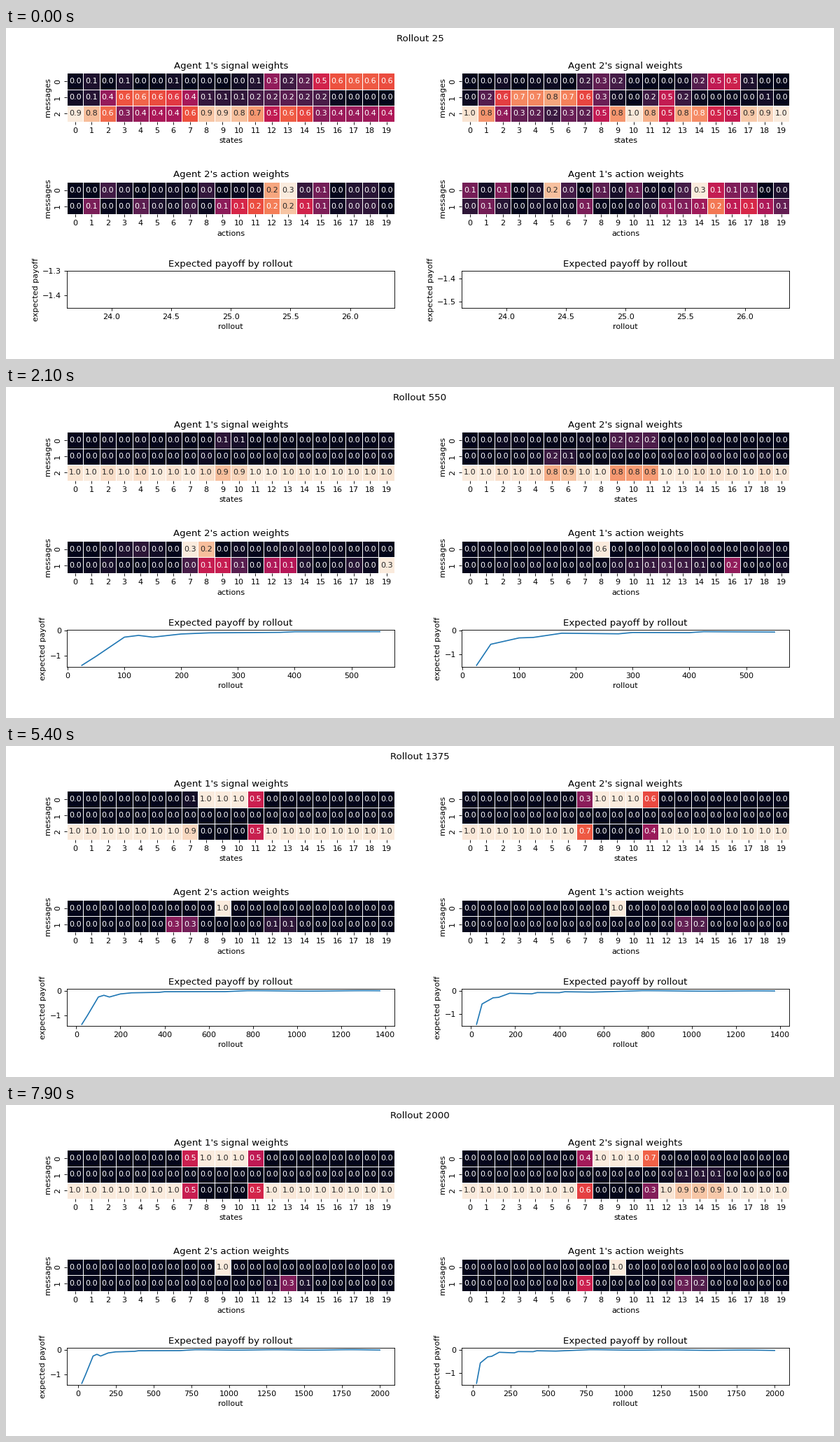
These frames come from a looping animation (1183 by 473 pixels, 8000 ms). A matplotlib script:

```python
import numpy as np
import matplotlib.pyplot as plt
from matplotlib.animation import FuncAnimation
from matplotlib.colors import LinearSegmentedColormap

W, H, DPI = 1183, 473, 80
FRAMES, STEP = 80, 25
LEFT, RIGHT = 87, 651
AX_W, CELL_H = 468.4, 23.2
SIGNAL_Y, ACTION_Y, PAYOFF_Y, PAYOFF_H = 64.4, 220, 347.2, 53

COLS = np.arange(20)
STAGES = [0, 7, 21, 30, 44, 63, 79]       # frames where learning turns
NOISE = [.09, .06, .035, .02, .01, .01, .01]

STOPS = [
    (0, "#03051a"), (1 / 11, "#221331"), (2 / 11, "#451c47"),
    (3 / 11, "#6a1f56"), (4 / 11, "#921c5b"), (5 / 11, "#b91657"),
    (6 / 11, "#d92847"), (7 / 11, "#ed503e"), (8 / 11, "#f47d57"),
    (9 / 11, "#f6a47c"), (10 / 11, "#f7c9aa"), (1, "#faebdd"),
]
ROCKET = LinearSegmentedColormap.from_list("rocket", STOPS)


class Weights:
    """Two rows of weights: flat-topped bumps that come and go, plus noise.

    A bump is (row, column, width, height, first stage, last stage).
    With edges (lo, hi) per stage from 2 on, a plateau grows in row 0
    and a third row takes whatever weight is left.
    """

    def __init__(self, seed, bumps, edges=None):
        self.bumps, self.edges = bumps, edges
        rng = np.random.default_rng(seed)
        shape = (len(STAGES), 2, 20)
        self.noise = rng.random(shape) ** 3 * np.reshape(NOISE, (-1, 1, 1))

    def at(self, frame):
        stage = np.interp(frame, STAGES, range(len(STAGES)))
        i = min(int(stage), len(STAGES) - 2)
        t = stage - i
        rows = (1 - t) * self.noise[i] + t * self.noise[i + 1]
        for row, col, width, height, first, last in self.bumps:
            life = np.clip(1 - max(first - stage, stage - last), 0, 1)
            rows[row] += life * height * np.exp(-((COLS - col) / width) ** 4)
        if self.edges is None:
            return np.clip(rows, 0, 1)
        lo, hi = (np.interp(stage, range(2, 7), e) for e in self.edges)
        height = np.interp(stage, [1, 2, 3], [0, .2, 1])
        flat = np.clip(COLS - lo, 0, 1) * np.clip(hi - COLS, 0, 1)
        rows[0] = np.maximum(rows[0], height * flat)
        rows[1] *= 1 - height * flat
        rest = 1 - rows.sum(axis=0)
        return np.clip(np.vstack([rows, rest]), 0, 1)


sig1 = Weights(1, [
    (0, 17.4, 3.4, .62, 0, 0), (0, 12, .9, .34, 0, 0),
    (1, 4.6, 3.1, .56, 0, 0), (1, 12.5, 3, .18, 0, 0),
    (1, 8, .6, .2, 1, 1), (1, 12.7, .7, .24, 1, 1),
], ([8.4, 7.8, 7, 6.9, 6.5], [10.3, 11.2, 11.47, 11.53, 11.47]))

sig2 = Weights(2, [
    (0, 15.3, 1.4, .45, 0, 0), (0, 8, 1.2, .25, 0, 0),
    (1, 4.6, 3.4, .74, 0, 0), (1, 12, .9, .45, 0, 0),
    (0, 10.2, 1.4, .13, 1, 1), (1, 5.4, .8, .14, 1, 2),
    (1, 14, 1.6, .1, 6, 6),
], ([8, 7.1, 6.6, 6.7, 6.6], [12, 11.2, 11.53, 11.7, 11.67]))

act2 = Weights(3, [
    (0, 12.6, .9, .26, 0, 0), (1, 12, 3, .17, 0, 0),
    (0, 7.4, .9, .27, 1, 2), (1, 6, .9, .18, 1, 1),
    (1, 8.5, 1.4, .13, 2, 2), (1, 12.6, 1.2, .12, 1, 5),
    (1, 19, .6, .25, 2, 3), (0, 9, .6, .99, 3, 6),
    (1, 6.4, .9, .35, 4, 5), (1, 13, .9, .32, 6, 6),
])

act1 = Weights(4, [
    (0, 5, .6, .22, 0, 0), (0, 14.3, .9, .17, 0, 0),
    (1, 16, 3.5, .11, 0, 0), (0, 10.4, .8, .49, 1, 1),
    (1, 12.7, .8, .42, 1, 1), (0, 8, .6, .58, 2, 2),
    (1, 11.5, 2.8, .08, 2, 2), (1, 16, .6, .21, 2, 3),
    (1, 9.5, .9, .2, 3, 3), (0, 9, .6, .99, 3, 6),
    (1, 13.3, 1, .26, 4, 6), (1, 7, .6, .5, 6, 6),
])

rollouts = STEP * np.arange(1, FRAMES + 1)


def payoff(bends):
    """Learning curve through a few bends, with a slow late ripple."""
    ripple = .008 * np.cos((rollouts - 800) / 80) * (rollouts > 750)
    return np.interp(rollouts, *zip(*bends)) + ripple


pay1 = payoff([(25, -1.3755), (50, -1.02), (100, -.26), (125, -.19),
               (150, -.26), (200, -.135), (250, -.09), (375, -.07),
               (400, -.045), (675, -.04), (750, -.01), (2000, -.008)])
pay2 = payoff([(25, -1.4466), (50, -.57), (100, -.305), (125, -.285),
               (175, -.11), (275, -.135), (300, -.08), (400, -.085),
               (425, -.045), (550, -.06), (750, -.005), (2000, -.025)])

fig = plt.figure(figsize=(W / DPI, H / DPI), dpi=DPI, facecolor="white")


def add_axes(x, top, height):
    return fig.add_axes([x / W, 1 - (top + height) / H, AX_W / W, height / H])


def ink(rgba):
    """Dark or white lettering, by the relative luminance of the cell."""
    c = rgba[:3]
    lin = np.where(c <= .03928, c / 12.92, ((c + .055) / 1.055) ** 2.4)
    return ".15" if lin @ (.2126, .7152, .0722) > .408 else "w"


class Heatmap:
    def __init__(self, x, top, weights, title, xlabel):
        self.weights = weights
        table = weights.at(0)
        n = len(table)
        ax = add_axes(x, top, n * CELL_H)
        self.mesh = ax.pcolormesh(table, cmap=ROCKET, linewidth=.5,
                                  edgecolor="white")
        self.labels = [ax.text(c + .5, r + .5, "", ha="center", va="center")
                       for r in range(n) for c in COLS]
        ax.set(xlim=(0, 20), ylim=(n, 0), xlabel=xlabel, ylabel="messages")
        ax.set_title(title)
        ax.spines[:].set_visible(False)
        ax.set_xticks(COLS + .5, COLS)
        ax.set_yticks(np.arange(n) + .5, range(n), rotation=90, va="center")

    def draw(self, frame):
        table = self.weights.at(frame)
        self.mesh.set_array(table)
        self.mesh.set_clim(table.min(), table.max())
        colours = ROCKET(self.mesh.norm(table)).reshape(-1, 4)
        for label, value, rgba in zip(self.labels, table.flat, colours):
            label.set_text(f"{value:.1f}")
            label.set_color(ink(rgba))


class Payoff:
    def __init__(self, x, values):
        self.values = values
        self.ax = add_axes(x, PAYOFF_Y, PAYOFF_H)
        self.line, = self.ax.plot([], [])
        self.ax.set(xlabel="rollout", ylabel="expected payoff")
        self.ax.set_title("Expected payoff by rollout")

    def draw(self, frame):
        n = frame + 1
        self.line.set_data(rollouts[:n], self.values[:n])
        self.ax.relim()
        self.ax.autoscale_view()


panels = [
    Heatmap(LEFT, SIGNAL_Y, sig1, "Agent 1's signal weights", "states"),
    Heatmap(RIGHT, SIGNAL_Y, sig2, "Agent 2's signal weights", "states"),
    Heatmap(LEFT, ACTION_Y, act2, "Agent 2's action weights", "actions"),
    Heatmap(RIGHT, ACTION_Y, act1, "Agent 1's action weights", "actions"),
    Payoff(LEFT, pay1),
    Payoff(RIGHT, pay2),
]
heading = fig.text(.5, 1 - 19 / H, "", ha="center", va="baseline", fontsize=12)


def draw(frame):
    heading.set_text(f"Rollout {rollouts[frame]}")
    for panel in panels:
        panel.draw(frame)
    return []


def reset():
    return draw(0)


anim = FuncAnimation(fig, draw, frames=FRAMES, init_func=reset,
                     interval=100, repeat=True, repeat_delay=0)
plt.show()
```
